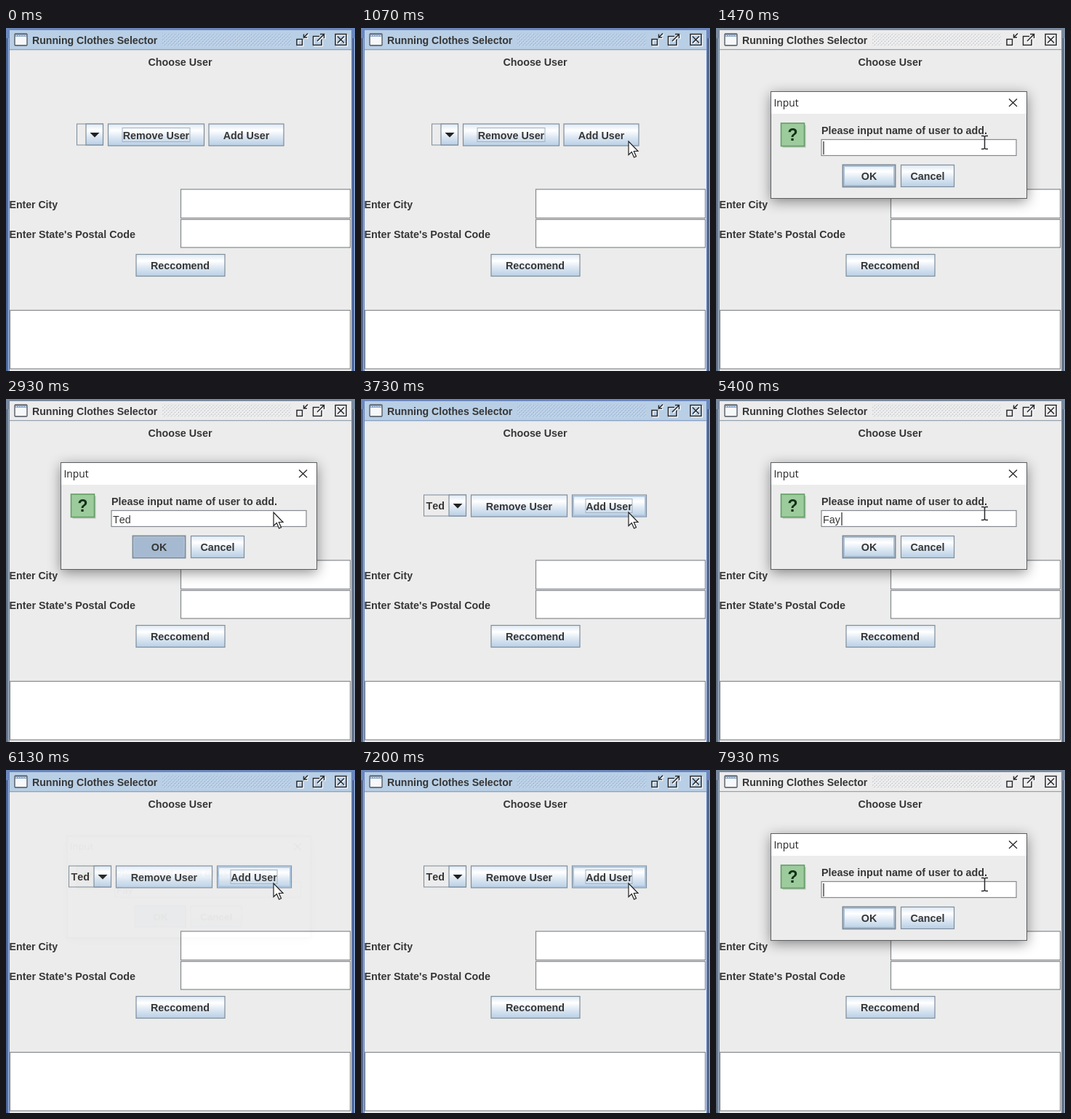
Write an HTML page that moves like this. It is 480 by 472 pixels and loops after 8 s.

```html
<!DOCTYPE html>
<html lang="en">
<head>
<meta charset="utf-8">
<title>Running Clothes Selector</title>
<style>
html, body { margin: 0; width: 100%; height: 100%; overflow: hidden; background: #ececec; }
svg { display: block; width: 100vw; height: 100vh; }
text { font: bold 14.3px "Liberation Sans", Arial, sans-serif; fill: #363636; font-kerning: none; }
.mid { text-anchor: middle; }
.plain { font-weight: normal; }
.caption { font: 13.8px "Open Sans", sans-serif; fill: #222; }
.btn { fill: url(#steel); stroke: #7f8d9b; stroke-width: 1.2; }
.field { fill: #fff; stroke: #85898e; stroke-width: 1.2; }
.focus { fill: none; stroke: #a3b1c0; }
.hover { fill: none; stroke: #a9c3de; stroke-width: 2; }
.ink { fill: none; stroke: #26282c; stroke-width: 1.5; }
.glow { fill: none; stroke: #fff; stroke-width: 1.5; }

/* one 8 s timeline: 1% = 80 ms */
.active, .frame, .dialog, .rowEmpty, .rowFilled, .first, .second, .cover, .blink, .pressed, .arrow, .beam {
  animation: 8s step-end infinite;
}
.active { animation-name: active; }
.frame { animation-name: frame; }
.dialog { animation-name: dialog; animation-timing-function: linear; transform-origin: 250.5px 160.5px; }
.rowEmpty { animation-name: rowEmpty; }
.rowFilled { animation-name: rowFilled; }
.first { animation-name: first; }
.second { animation-name: second; }
.cover { animation-name: typing; }
.blink { animation-name: blink; }
.pressed { animation-name: pressed; }
.arrow { animation-name: arrow; }
.beam { animation-name: beam; }

/* the title loses focus just before the frame border does */
@keyframes active {
  0% { opacity: 1 } 16.2% { opacity: 0 }
  37.5% { opacity: 1 } 54.6% { opacity: 0 }
  75.8% { opacity: 1 } 94.8% { opacity: 0 } 100% { opacity: 0 }
}
@keyframes frame {
  0% { opacity: 1 } 17.2% { opacity: 0 }
  37.5% { opacity: 1 } 55.7% { opacity: 0 }
  75.8% { opacity: 1 } 95.8% { opacity: 0 } 100% { opacity: 0 }
}
@keyframes dialog {
  0%, 15.9% { opacity: 0; transform: scale(.95) }
  16.7% { opacity: .33; transform: scale(.968) }
  18%, 36.8% { opacity: 1; transform: none }
  38.4%, 54.2% { opacity: 0; transform: scale(.95) }
  55% { opacity: .33; transform: scale(.968) }
  56.6%, 75.1% { opacity: 1; transform: none }
  76.7%, 94.4% { opacity: 0; transform: scale(.95) }
  95.2% { opacity: .33; transform: scale(.968) }
  96.6%, 100% { opacity: 1; transform: none }
}
@keyframes rowEmpty { 0% { opacity: 1 } 37.5%, 100% { opacity: 0 } }
@keyframes rowFilled { 0% { opacity: 0 } 37.5%, 100% { opacity: 1 } }
@keyframes first { 0% { opacity: 1 } 45%, 100% { opacity: 0 } }
@keyframes second { 0% { opacity: 0 } 45% { opacity: 1 } 85%, 100% { opacity: 0 } }
@keyframes typing {
  0% { transform: none }
  25% { transform: translateX(9px) }
  27.5% { transform: translateX(17px) }
  30% { transform: translateX(25px) }
  45% { transform: none }
  62% { transform: translateX(9px) }
  64.4% { transform: translateX(17px) }
  66.6% { transform: translateX(25px) }
  85%, 100% { transform: none }
}
@keyframes blink {
  0% { opacity: 1 } 22% { opacity: 0 } 25% { opacity: 1 } 35.5% { opacity: 0 }
  45% { opacity: 1 } 72% { opacity: 0 } 85%, 100% { opacity: 1 }
}
@keyframes pressed {
  0% { opacity: 0 } 35.9% { opacity: 1 } 39% { opacity: 0 }
  74.3% { opacity: 1 } 77% { opacity: 0 } 100% { opacity: 0 }
}
@keyframes arrow {
  0% { opacity: 0 } 5% { opacity: 1 } 16.5% { opacity: 0 }
  36% { opacity: 1 } 54.8% { opacity: 0 }
  74.5% { opacity: 1 } 95% { opacity: 0 } 100% { opacity: 0 }
}
@keyframes beam {
  0% { opacity: 0 } 16.5% { opacity: 1 } 36% { opacity: 0 }
  54.8% { opacity: 1 } 74.5% { opacity: 0 } 95%, 100% { opacity: 1 }
}
</style>
</head>
<body>
<svg viewBox="0 0 480 472" preserveAspectRatio="none">
  <defs>
    <linearGradient id="steel" x2="0" y2="1">
      <stop stop-color="#dde8f3"/>
      <stop offset=".3" stop-color="#fff"/>
      <stop offset=".6" stop-color="#dde8f3"/>
      <stop offset="1" stop-color="#b8cfe5"/>
    </linearGradient>
    <pattern id="bumpsGrey" width="4.76" height="4.76" patternUnits="userSpaceOnUse">
      <path d="M0 0h1.2v1.2h-1.2zM2.4 2.4h1.2v1.2h-1.2z" fill="#fff"/>
      <path d="M1.2 1.2h1.2v1.2h-1.2zM3.6 3.6h1.1v1.1h-1.1z" fill="#a4adb7"/>
    </pattern>
    <pattern id="bumpsBlue" width="4.76" height="4.76" patternUnits="userSpaceOnUse">
      <path d="M0 0h1.2v1.2h-1.2zM2.4 2.4h1.2v1.2h-1.2z" fill="#dfeaf5"/>
      <path d="M1.2 1.2h1.2v1.2h-1.2zM3.6 3.6h1.1v1.1h-1.1z" fill="#809cc8"/>
    </pattern>
    <path id="controls" d="M400 15.500h7.500v8h-7.500zM415 7.500l-5 5M409.500 8.500v4.500h4.500
      M431 11.500h-8.500v12h11.500v-8M428 18l9-9M432 8.500h5.500v5.500
      M453 8.500h15v15h-15zM456 11.500l9 9M465 11.500l-9 9"/>
    <path id="border" d="M0 0H480V472H475V3H5V472H0z"/>
    <path id="sides" d="M1.5 14V472M477.5 14V472"/>
    <path id="edges" d="M3 14V472M479 14V472"/>
  </defs>

  <!-- window frame, inactive then active -->
  <rect width="480" height="472" fill="#ececec"/>
  <use href="#border" fill="#7a8a9f"/>
  <use href="#sides" stroke="#465264" stroke-width="1.2"/>
  <use href="#edges" stroke="#a3b4c6"/>
  <g class="frame">
    <use href="#border" fill="#6b87bf"/>
    <use href="#sides" stroke="#2b3b60" stroke-width="1.2"/>
    <use href="#edges" stroke="#9bb2d2"/>
  </g>

  <rect x="5" y="3" width="470" height="27" fill="#ececec"/>
  <rect x="215" y="7" width="177" height="18" fill="url(#bumpsGrey)"/>
  <path d="M5 29.7H475" stroke="#8493a2"/>
  <g class="active">
    <rect x="5" y="3" width="470" height="27" fill="#b9cfe5"/>
    <rect x="215" y="7" width="177" height="18" fill="url(#bumpsBlue)"/>
    <path d="M5 29.7H475" stroke="#7f99c4"/>
  </g>

  <rect x="12" y="8" width="17" height="16" rx="1" fill="#f6f8fa" stroke="#4a525c" stroke-width="1.3"/>
  <path d="M13 10.5H28" stroke="#8ea9cb" stroke-width="3"/>
  <path d="M14 10.5H27" stroke="#fff" stroke-dasharray="1 2"/>
  <text x="36" y="21.5" style="font-size:14.1px">Running Clothes Selector</text>
  <use class="glow" href="#controls" x="1.300" y="1.300"/>
  <use class="ink" href="#controls"/>

  <!-- window content -->
  <text class="mid" x="239.500" y="51.500">Choose User</text>

  <g class="rowEmpty">
    <rect x="97.500" y="132" width="36" height="29" fill="#ececec" stroke="#7a8a99"/>
    <rect class="btn" x="110" y="132" width="23.500" height="29"/>
    <path d="M115.500 144h13l-6.500 6.500z" fill="#222"/>
    <rect class="btn" x="140.500" y="132" width="132" height="30"/>
    <text class="mid" x="206.500" y="152.500">Remove User</text>
    <rect class="focus active" x="160" y="137.500" width="93" height="19"/>
    <rect class="btn" x="279" y="132" width="103" height="30"/>
    <text class="mid" x="330.500" y="152.500">Add User</text>
  </g>

  <g class="rowFilled">
    <rect x="86.500" y="132" width="58" height="29" fill="#ececec" stroke="#7a8a99"/>
    <rect class="btn" x="121" y="132" width="23.500" height="29"/>
    <path d="M126.500 144h13l-6.500 6.500z" fill="#222"/>
    <text x="89.500" y="152">Ted</text>
    <rect class="btn" x="151.500" y="132" width="132" height="30"/>
    <text class="mid" x="217.500" y="152.500">Remove User</text>
    <rect class="btn" x="290.500" y="132" width="102" height="30"/>
    <rect class="hover" x="292" y="133.500" width="99" height="27"/>
    <text class="mid" x="341" y="152.500">Add User</text>
    <rect class="focus active" x="309" y="137.500" width="64" height="19"/>
  </g>

  <text x="4.500" y="248" style="font-size:14.1px">Enter City</text>
  <text x="4.500" y="289">Enter State's Postal Code</text>
  <rect class="field" x="240.500" y="222" width="233" height="39.500"/>
  <rect class="field" x="240.500" y="263.500" width="233" height="38.500"/>
  <rect class="btn" x="179" y="311.500" width="122" height="30"/>
  <text class="mid" x="239.500" y="332">Reccomend</text>
  <rect class="field" x="5.500" y="388.500" width="468" height="80.500"/>

  <!-- input dialog -->
  <g class="dialog">
    <rect x="75.500" y="87.500" width="352" height="147" fill="#ececec" style="filter:drop-shadow(0 4px 9px rgba(0,0,0,.45))"/>
    <rect x="75.500" y="87.500" width="352" height="147" fill="#ececec" stroke="#5c5e60"/>
    <rect x="76" y="88" width="351" height="30" fill="#fff"/>
    <text class="caption" x="79.500" y="107.500">Input</text>
    <path class="ink" style="stroke-width:1.3" d="M403 97.500l11 10.500M414 97.500l-11 10.500"/>

    <rect x="91.500" y="133.500" width="32" height="31" fill="#b9c0b9"/>
    <rect x="89.500" y="131" width="32" height="31.500" fill="#9ccb9c" stroke="#5f9c62" stroke-width="1.5"/>
    <text class="mid" x="105.500" y="154.500" style="font-size:23px;fill:#123016">?</text>

    <text x="145" y="145.500">Please input name of user to add.</text>
    <rect class="field" x="145" y="153.500" width="268" height="22"/>
    <text class="plain first" x="147" y="171">Ted</text>
    <text class="plain second" x="147" y="171">Fay</text>
    <g class="cover">
      <rect x="147" y="155" width="36" height="19" fill="#fff"/>
      <path class="blink" d="M148 156V174" stroke="#222" stroke-width="1.2"/>
    </g>

    <rect class="btn" x="174.500" y="188.500" width="72" height="30" style="stroke-width:2"/>
    <rect class="pressed" x="175.500" y="189.500" width="70" height="28" fill="#a5bad0"/>
    <rect x="176.500" y="190.500" width="68" height="26" fill="none" stroke="#a9bfd6"/>
    <text class="mid" x="210.500" y="209">OK</text>
    <rect class="btn" x="254.500" y="188.500" width="73" height="30"/>
    <text class="mid" x="291" y="209">Cancel</text>
  </g>

  <!-- pointer -->
  <path class="arrow" d="M368 156v18.500l4.300-4 3.200 7.500 3-1.300-3.200-7.200h5.700z" fill="#fff" stroke="#222" stroke-width="1.200"/>
  <path class="beam ink" d="M365 148.500h3l1.500 1 1.500-1h3M369.500 149v17M365 166.500h3l1.500-1 1.500 1h3"/>
</svg>
</body>
</html>
```
